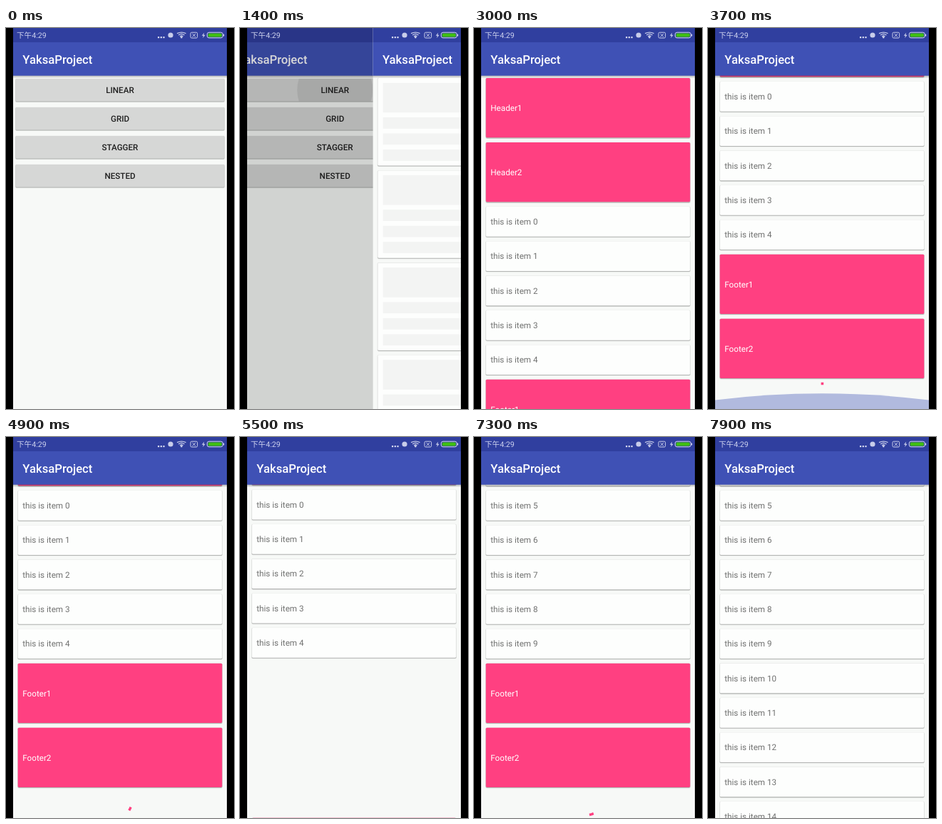
Write an HTML page that moves like this. It is 320 px wide and 533 px high and loops after 8 s.

```html
<!DOCTYPE html>
<html lang="en">
<head>
<meta charset="utf-8">
<style>
  html, body { margin: 0; width: 100%; height: 100%; overflow: hidden; background: #000; }
  svg { display: block; width: 320px; height: 533px; }
  text { font-family: Roboto, "Noto Sans CJK SC", "Noto Sans CJK", sans-serif; font-size: 11.67px; text-rendering: geometricPrecision; }
  .title { font-size: 16.67px; font-weight: 500; fill: #fff; }
  .button { font-weight: 500; fill: #202020; text-anchor: middle; }
  .clock { font-size: 10.6px; fill: #ced3ef; }
</style>
</head>
<body>
<svg id="stage" viewBox="0 0 320 533"></svg>
<script>
const LOOP = 8000, WIDTH = 300, LEFT = 10;
const ITEM_PITCH = 48.333, BLOCK_PITCH = 90, BATCH = 5 * ITEM_PITCH;
const FIRST_ITEM = 250, END_SCROLL = 175;
const PINK = '#ff4081', PAPER = '#f7f9f7';

const stage = document.getElementById('stage');

function add(parent, tag, attrs = {}, text) {
  const node = document.createElementNS('http://www.w3.org/2000/svg', tag);
  for (const key in attrs) node.setAttribute(key, attrs[key]);
  if (text) node.textContent = text;
  parent.appendChild(node);
  return node;
}
const rect = (parent, x, y, width, height, fill, more) =>
  add(parent, 'rect', { x, y, width, height, fill, ...more });
const group = (parent, attrs) => add(parent, 'g', attrs);
const move = (node, x, y) => node.setAttribute('transform', `translate(${x} ${y})`);
const fade = (node, value) => node.setAttribute('opacity', value);

function card(parent, x, y, w, h, fill) {
  rect(parent, x - 0.7, y - 0.3, w + 1.4, h + 1.9, '#000', { rx: 2, opacity: 0.09 });
  rect(parent, x, y + 0.3, w, h + 0.8, '#000', { rx: 1.7, opacity: 0.2 });
  rect(parent, x, y, w, h, fill, { rx: 1.7 });
}

function labelCard(parent, label, h, fill, ink) {
  const g = group(parent);
  card(g, 16.67, 0, 286.67, h, fill);
  add(g, 'text', { x: 23.3, y: h / 2 + 4.2, fill: ink }, label);
  return g;
}

function appBar(parent) {
  rect(parent, LEFT, 66, WIDTH, 4.5, 'url(#barShadow)');
  rect(parent, LEFT, 0, WIDTH, 20, '#303f9f');
  rect(parent, LEFT, 20, WIDTH, 46.7, '#3f51b5');
  add(parent, 'text', { x: 23.3, y: 50, class: 'title' }, 'YaksaProject');
}

// Definitions
const defs = add(stage, 'defs');
const shade = add(defs, 'linearGradient', { id: 'barShadow', x2: 0, y2: 1 });
add(shade, 'stop', { 'stop-color': '#000', 'stop-opacity': 0.3 });
add(shade, 'stop', { offset: 1, 'stop-color': '#000', 'stop-opacity': 0 });
rect(add(defs, 'clipPath', { id: 'screen' }), LEFT, 0, WIDTH, 533, '#000');
rect(add(defs, 'clipPath', { id: 'press' }), 13.5, 71, 293, 31.5, '#000', { rx: 1.7 });

rect(stage, 0, 0, 320, 533, '#000');
const screen = group(stage, { 'clip-path': 'url(#screen)' });

// Menu page
const menu = group(screen);
rect(menu, LEFT, 0, WIDTH, 533, PAPER);
const captions = ['LINEAR', 'GRID', 'STAGGER', 'NESTED'];
captions.forEach((_, i) => card(menu, 13.5, 71 + 40 * i, 293, 31.5, '#d6d7d6'));
const ripple = add(menu, 'circle', { cx: 160, cy: 86.7, r: 0, opacity: 0.08, 'clip-path': 'url(#press)' });
captions.forEach((name, i) => add(menu, 'text', { x: 160, y: 91.3 + 40 * i, class: 'button' }, name));
appBar(menu);
const dim = rect(screen, LEFT, 0, WIDTH, 533, '#000');

// List page
const page = group(screen);
rect(page, LEFT, 0, WIDTH, 533, PAPER);

const skeleton = group(page);
for (let i = 0; i < 4; i++) {
  const y = 70 + 129.2 * i;
  card(skeleton, 16.67, y, 286.67, 122.5, '#fdfefd');
  rect(skeleton, 24, y + 6.7, 272.5, 41.6, '#f3f4f3');
  for (let k = 0; k < 3; k++) rect(skeleton, 24, y + 55 + 22.5 * k, 272.5, 15.8, '#f3f4f3');
}

const list = group(page);
['Header1', 'Header2'].forEach((name, i) =>
  move(labelCard(list, name, 83.3, PINK, '#fff'), 0, 70 + BLOCK_PITCH * i));
const items = [];
for (let i = 0; i < 15; i++) {
  const item = labelCard(list, `this is item ${i}`, 41.67, '#fdfefd', '#707170');
  move(item, 0, FIRST_ITEM + ITEM_PITCH * i);
  items.push(item);
}
const footer = group(list);
['Footer1', 'Footer2'].forEach((name, i) =>
  move(labelCard(footer, name, 83.3, PINK, '#fff'), 0, BLOCK_PITCH * i));
const spinner = add(footer, 'path', {
  fill: 'none', stroke: PINK, 'stroke-width': 3.4, 'stroke-linecap': 'square'
});
const glow = add(page, 'path', { fill: '#3f51b5' });
appBar(page);

// Status bar
const status = group(stage, { fill: '#c8cdea' });
add(status, 'text', { x: 15, y: 14.2, class: 'clock' }, '下午4:29');
for (let i = 0; i < 3; i++) rect(status, 213 + 3.7 * i, 12, 2.2, 2.2, '#d5d9f0');
add(status, 'circle', { cx: 231, cy: 10, r: 3.6 });
const lines = group(status, { fill: 'none', stroke: '#c8cdea', 'stroke-width': 1.4 });
[[6.2, 4.6], [4.1, 6.9], [2, 9.2]].forEach(([w, y]) =>
  add(lines, 'path', { d: `M${246.3 - w} ${y + 3}Q246.3 ${y} ${246.3 + w} ${y + 3}` }));
add(status, 'circle', { cx: 246.3, cy: 13, r: 1.4 });
add(lines, 'rect', { x: 259, y: 6.2, width: 9.6, height: 7.8, rx: 1.5, 'stroke-width': 1 });
add(lines, 'path', { d: 'M261.6 8l4.4 4.4M266 8l-4.4 4.4', 'stroke-width': 1 });
add(status, 'path', { d: 'M278.2 6.4l-3.4 4.3h2.2l-.8 3.4 3.5-4.4h-2.3z' });
rect(status, 282.3, 6.2, 22, 7.6, '#303f9f', { rx: 2.6, stroke: '#d5d9ee', 'stroke-width': 1 });
rect(status, 283.7, 7.6, 19.2, 4.8, '#3fbf12', { rx: 1.5 });
rect(status, 305, 8.5, 1.2, 3, '#d5d9ee', { rx: 0.6 });

// Timing
const span = (t, from, to) => Math.min(1, Math.max(0, (t - from) / (to - from)));
const smooth = p => p * p * (3 - 2 * p);
const slow = p => 1 - (1 - p) * (1 - p);

// Bezier easing whose y control values are 0, 0, 1, 1
function bezier(x0, x1, x2, x3, x) {
  let lo = 0, hi = 1;
  for (let i = 0; i < 24; i++) {
    const s = (lo + hi) / 2, r = 1 - s;
    const at = x0 * r * r * r + 3 * x1 * r * r * s + 3 * x2 * r * s * s + x3 * s * s * s;
    if (at < x) lo = s; else hi = s;
  }
  return smooth(lo);
}

function arc(ms) {
  const p = (ms % 1333) / 1333;
  const tail = p < 0.5 ? 0 : bezier(0.5, 0.7, 0.6, 1, p);
  const head = p > 0.5 ? 1 : bezier(0, 0.2, 0.1, 0.5, p);
  const turn = 0.25 * p + 2 * ms / 6665;
  const from = 0.75 * tail + turn;
  const to = Math.max(0.75 * head + turn, from + 0.002);
  const r = 15.5;
  const point = a => {
    const angle = a * 2 * Math.PI;
    return `${(160.3 + r * Math.sin(angle)).toFixed(3)} ${(196.3 - r * Math.cos(angle)).toFixed(3)}`;
  };
  return `M${point(from)}A${r} ${r} 0 ${to - from > 0.5 ? 1 : 0} 1 ${point(to)}`;
}

function draw(t) {
  const left = Math.pow(1 - span(t, 1280, 1900), 2.44);
  move(menu, -0.217 * WIDTH * (1 - left), 0);
  fade(dim, 0.375 * (1 - left));
  ripple.setAttribute('r', 73 * slow(span(t, 1220, 1600)));
  move(page, WIDTH * left, 0);

  const shown = smooth(span(t, 2650, 2990));
  fade(skeleton, 1 - shown);
  fade(list, shown);

  const scroll = END_SCROLL * smooth(span(t, 3410, 3660)) + BATCH * slow(span(t, 5500, 5880));
  move(list, 0, -scroll);

  const pushed = smooth(span(t, 5300, 5550)) + smooth(span(t, 7500, 7750));
  move(footer, 0, FIRST_ITEM + BATCH * (1 + pushed));
  items.forEach((item, i) => {
    const start = i < 5 ? 0 : i < 10 ? 5550 : 7750;
    fade(item, start ? span(t, start, start + 120) : 1);
  });
  spinner.setAttribute('d', arc(Math.max(0, t - (t < 5700 ? 3700 : 5890))));

  const pull = slow(span(t, 3620, 3720)) * Math.pow(1 - span(t, 3720, 4340), 2);
  const mid = 533 - 22.5 * pull, edge = 533 - 13 * pull;
  glow.setAttribute('d', `M10 533V${edge}Q160 ${2 * mid - edge} 310 ${edge}V533Z`);
  fade(glow, 0.38 * Math.min(1, pull * 1.1));
}

const begin = performance.now();
function tick() {
  draw((performance.now() - begin) % LOOP);
  requestAnimationFrame(tick);
}
tick();
</script>
</body>
</html>
```
